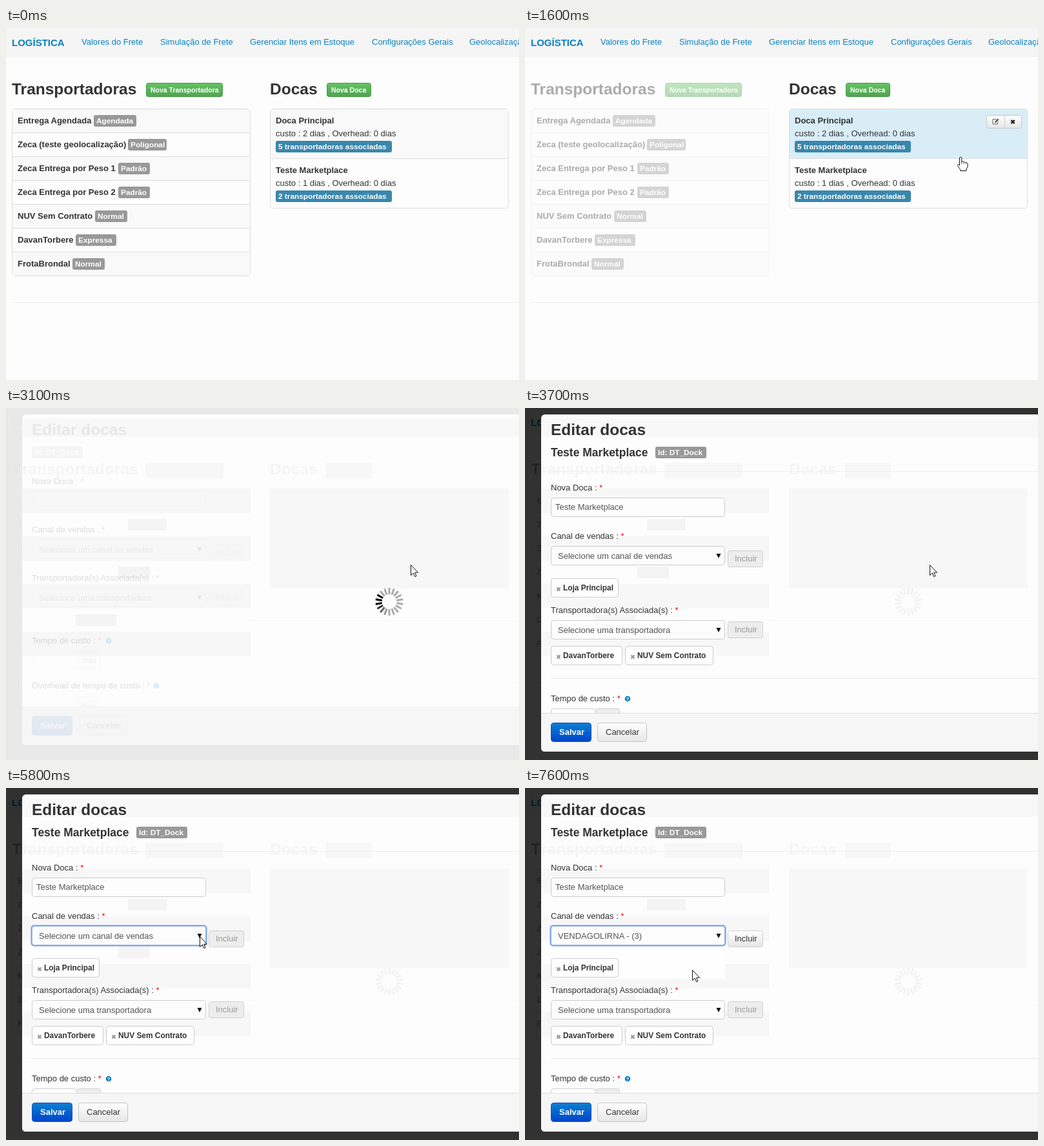
These frames come from a looping animation (795x546 px, 8 s). An HTML page:

```html
<!DOCTYPE html>
<html lang="pt">
<head>
<meta charset="utf-8">
<title>Editar docas</title>
<style>
html, body { margin: 0; width: 100%; height: 100%; overflow: hidden; background: #fdfdfd }
svg { display: block; width: 795px; height: 546px; font: 13px "Liberation Sans", Arial, sans-serif; fill: #333 }
.b { font-weight: bold }
.h { font-weight: bold; font-size: 24.5px }
.tag { font-weight: bold; font-size: 11.844px; fill: #fff }
.mini { font-weight: bold; font-size: 10.5px; fill: #fff }
.chip { font-weight: bold; font-size: 11.9px }
.nav { fill: #0a80c4 }
.field { fill: #555 }
.req { fill: #f00 }
</style>
</head>
<body>
<svg viewBox="0 0 795 546">
  <defs>
    <linearGradient id="green" x2="0" y2="1"><stop stop-color="#62c462"/><stop offset="1" stop-color="#51a351"/></linearGradient>
    <linearGradient id="blue" x2="0" y2="1"><stop stop-color="#0a80d0"/><stop offset="1" stop-color="#0044cc"/></linearGradient>
    <linearGradient id="grey" x2="0" y2="1"><stop stop-color="#fff"/><stop offset="1" stop-color="#e6e6e6"/></linearGradient>
  </defs>
  <g id="stage"></g>
</svg>
<script>
const $ = id => document.getElementById(id);
const text = (x, y, s, cls = '') => `<text x="${x}" y="${y}" class="${cls}">${s}</text>`;
const rect = (x, y, w, h, fill, more = '') => `<rect x="${x}" y="${y}" width="${w}" height="${h}" fill="${fill}" ${more}/>`;
const box = (x, y, w, h, fill, stroke = '#ccc', r = 4) =>
  rect(x + .5, y + .5, w - 1, h - 1, fill, `stroke="${stroke}" rx="${r}"`);
const group = (id, s) => `<g id="${id}">${s}</g>`;
const path = (d, more) => `<path d="${d}" ${more}/>`;
const cross = (x, y, r, color) =>
  path(`M${x - r} ${y - r}l${2 * r} ${2 * r}m0 ${-2 * r}l${-2 * r} ${2 * r}`, `stroke="${color}" stroke-width="2.4"`);
const tag = (x, y, w, s, fill = '#999') => rect(x, y, w, 18, fill, 'rx="3"') + text(x + 4, y + 13, s, 'tag');
const greenButton = (x, w, s) => box(x, 85, w, 22, 'url(#green)', '#4a9a4a', 3) + text(x + 7, 100, s, 'mini');
const label = (y, s) => `<text x="40" y="${y}">${s} : <tspan class="req">*</tspan></text>`;
const help = (x, y) => `<circle cx="${x}" cy="${y}" r="4.3" fill="#0a80c4"/>` +
  `<text x="${x}" y="${y + 3}" font-size="8" font-weight="bold" fill="#fff" text-anchor="middle">?</text>`;
const chip = (x, y, w, s) => box(x, y, w, 30, '#fefefe') + cross(x + 12, y + 17, 2.5, '#999') + text(x + 19, y + 19, s, 'chip');
const select = (y, s, id) => box(40, y, 270, 30, '#fcfcfc') +
  `<text id="${id}" x="51" y="${y + 20}" class="field">${s}</text>` + path(`M296.5 ${y + 12}h7l-3.5 7z`, 'fill="#111"');
const include = (y, fill, color) => box(314, y, 55, 26, fill, '#d0d0d0', 3) +
  `<text x="325" y="${y + 17}" style="fill:${color}">Incluir</text>`;
const daysField = y => box(40, y, 70, 30, '#fff') + box(109, y, 38, 30, '#eee') + text(117, y + 20, 'dias', 'field');

const carriers = [
  ['Entrega Agendada', 'Agendada', 136, 66], ['Zeca (teste geolocalização)', 'Poligonal', 189, 60],
  ['Zeca Entrega por Peso 1', 'Padrão', 174, 49], ['Zeca Entrega por Peso 2', 'Padrão', 174, 49],
  ['NUV Sem Contrato', 'Normal', 138, 50], ['DavanTorbere', 'Expressa', 108, 63], ['FrotaBrondal', 'Normal', 103, 50]];
const nav = [['Valores do Frete', 117], ['Simulação de Frete', 239], ['Gerenciar Itens em Estoque', 378],
  ['Configurações Gerais', 567], ['Geolocalização', 718]];
const options = ['Selecione um canal de vendas', 'B2B - (2)', 'VENDAGOLIRNA - (3)'];

const left = text(9, 103, 'Transportadoras', 'h') + greenButton(217, 119, 'Nova Transportadora') +
  box(9, 125, 370, 260, '#fdfdfd', '#ddd') +
  carriers.map(([name, kind, x, w], i) => {
    const y = 125 + 37 * i;
    return (i % 2 ? '' : rect(10, y + 1, 368, 36, '#f9f9f9')) + (i ? rect(10, y, 368, 1, '#ddd') : '') +
      text(18, y + 23, name, 'b') + tag(x, y + 10, w, kind);
  }).join('');

const dock = (y, name, cost, count) => text(418, y + 23, name, 'b') +
  text(418, y + 43, `custo : ${cost} dias , Overhead: 0 dias`) +
  tag(418, y + 50, 180, count + ' transportadoras associadas', '#3a87ad');

const tools = box(715, 135, 55, 21, 'url(#grey)', '#c8c8c8', 3) + rect(743, 136, 1, 19, '#ccc') + cross(756, 145.5, 2.7, '#222') +
  path('M730.5 141.500h-5.500v7.500h7.500v-3', 'fill="none" stroke="#666"') + path('M728 147l.5-2.300 4.200-4.200 1.800 1.800-4.200 4.200z', 'fill="#555"');

const page = rect(0, 0, 795, 546, '#fdfdfd') + rect(0, 0, 795, 45, '#f5f5f5') +
  `<text x="9" y="28" class="nav b" font-size="15">LOGÍSTICA</text>` +
  nav.map(([s, x]) => text(x, 26, s, 'nav')).join('') + group('left', left) +
  text(409, 103, 'Docas', 'h') + greenButton(497, 69, 'Nova Doca') +
  box(409, 125, 370, 155, '#fdfdfd', '#ddd') + rect(410, 126, 368, 76, '#f9f9f9') +
  rect(410, 126, 368, 76, '#d9edf7', 'id="hover"') + rect(410, 202, 368, 1, '#ddd') +
  dock(125, 'Doca Principal', 2, 5) + dock(202, 'Teste Marketplace', 1, 2) + group('tools', tools) +
  rect(9, 425, 786, 1, '#eee');

// faint traces of the page that stay visible through the dialog
const traces = rect(25, 16, 770, 29, '#f8f8f8') +
  [125, 199, 273, 347].map(y => rect(25, y, 354, 38, '#f7f7f7')).join('') +
  rect(409, 125, 370, 155, '#f7f7f7') + rect(216, 85, 121, 24, '#f7f7f7') + rect(496, 85, 71, 24, '#f7f7f7') +
  [[189, 172, 60], [174, 246, 49], [108, 320, 63]].map(([x, y, w]) => rect(x, y, w, 18, '#f4f4f4')).join('') +
  `<g opacity=".035">${text(25, 103, 'ransportadoras', 'h')}${text(409, 103, 'Docas', 'h')}</g>` +
  rect(25, 425, 770, 1, '#f8f8f8') + rect(379, 329, 416, 1, '#f6f6f6');

const fieldsA = rect(25, 98, 770, 1, '#eee') + box(40, 139, 270, 30, '#fdfdfd') +
  group('dockName', text(47, 158, 'Teste Marketplace', 'field')) + select(214, options[0], 'channel') +
  rect(39.5, 213.5, 271, 31, 'none', 'id="focus" stroke="#73a2ec" stroke-width="2" rx="4"') +
  group('includeOff', include(221, '#ededed', '#999')) + group('includeOn', include(221, 'url(#grey)', '#333'));
const fieldsB = select(329, 'Selecione uma transportadora', 'carrier') + include(331, '#ededed', '#999');
const fieldsC = rect(40, 419, 755, 1, '#e8e8e8') + daysField(466) + group('extraField', daysField(537));
const labelsA = label(128, 'Nova Doca') + label(203, 'Canal de vendas');
const labelsC = label(455, 'Tempo de custo') + help(159, 451) +
  group('extraLabel', label(525, 'Overhead de tempo de custo') + help(233, 521));
const chips = chip(40, 264, 105, 'Loja Principal') + chip(40, 369, 111, 'DavanTorbere') + chip(155, 369, 137, 'NUV Sem Contrato');
const list = box(40, 244, 270, 52, '#fff', '#5b82c4', 0) + rect(41, 245, 268, 17, '#1e90ff', 'id="mark"') +
  options.map((s, i) => `<text class="option" x="51" y="${[257, 274, 290][i]}">${s}</text>`).join('');

const modal = rect(25, 10, 790, 523, '#fdfdfd', 'id="panel" rx="6"') + traces +
  rect(41, 244, 269, 52, '#fefefe', 'id="cleared"') +
  `<g class="content">${text(40, 42, 'Editar docas', 'h')}
    ${group('dockTitle', `<text x="40" y="75" class="b" font-size="17.5">Teste Marketplace</text>`)}
    ${group('dockId', tag(202, 60, 79, 'Id: DT_Dock'))}
    <g class="a">${fieldsA}</g><g class="p">${fieldsB}</g><g class="c">${fieldsC}</g>${group('chips', chips)}</g>
  <g class="labels"><g class="a">${labelsA}</g><g class="p">${label(318, 'Transportadora(s) Associada(s)')}</g><g class="c">${labelsC}</g></g>
  ${group('list', list)}
  <g class="a">${path('M25 473H795V533H31Q25 533 25 527Z', 'fill="#f6f6f6"')}
    <g class="content">${rect(25, 473, 770, 1, '#ddd')}
    ${box(40, 488, 63, 30, 'url(#blue)', '#0a50b8')}<text x="53" y="507" class="b" style="fill:#fff">Salvar</text>
    ${box(112, 488, 77, 30, 'url(#grey)', '#c4c4c4')}${text(125, 507, 'Cancelar')}</g></g>`;

const SPOKES = 18;
const spokes = Array.from({length: SPOKES}, (_, i) =>
  `<path class="spoke" d="M11.500 0H21.500" stroke="#000" stroke-width="3" transform="translate(594 300.500) rotate(${(i + .5) * 360 / SPOKES})"/>`).join('');

$('stage').innerHTML = page + rect(0, 0, 795, 546, '#fdfdfd', 'id="wash"') + rect(0, 0, 795, 546, '#000', 'id="shade"') +
  group('modal', modal) + group('spinner', spokes) + group('cursor',
    path('M.5 .5V16.500L4.300 13L6.700 18.700L9 17.700L6.600 12.200H11.500Z', 'id="arrow" fill="#fff" stroke="#111"') +
    path('M-1.500 2Q0 -.5 1.700 2V8.500Q3.500 7 5 9Q6.800 8 8 10Q10.500 9.500 11 11.500V16L8.800 20V22.500H-.5V20.500L-4.500 14.500Q-4.500 11 -1.500 14Z',
      'id="hand" fill="#fff" stroke="#111"') + path('M1.700 9v3M5 10v2M8 11v1', 'id="knuckles" stroke="#444"'));

const cursorPath = [[800, 782, 79], [1000, 770, 108], [1200, 735, 150], [1600, 675, 199], [2100, 627, 243], [3800, 627, 243],
  [4300, 520, 268], [4700, 416, 260], [5000, 320, 231], [5200, 292, 235], [5300, 292, 235], [5400, 300, 230],
  [6000, 300, 230], [6400, 272, 264], [6800, 259, 282]];

function along(keys, t, k = 1) {
  const i = keys.findIndex(key => key[0] > t);
  if (i < 0) return keys[keys.length - 1][k];
  if (!i) return keys[0][k];
  const [a, b] = [keys[i - 1], keys[i]];
  return a[k] + (b[k] - a[k]) * (t - a[0]) / (b[0] - a[0]);
}
const show = (id, on) => $(id).style.display = on ? '' : 'none';
const fade = (id, v) => $(id).style.opacity = v;
const each = (sel, fn) => document.querySelectorAll(sel).forEach(fn);
const shift = (sel, x, y) => each(sel, e => e.setAttribute('transform', `translate(${x} ${y})`));

function draw(t) {
  const x = along(cursorPath, t), y = along(cursorPath, t, 2);
  const over = t >= 800 && y >= 126 && t < 3000;
  const row = y < 203 ? 0 : 1;
  show('cursor', t >= 800);
  shift('#cursor', Math.round(x), Math.round(y));
  show('arrow', !over);
  show('hand', over);
  show('knuckles', over);

  fade('left', along([[1000, 1], [1300, .4]], t));
  show('hover', over);
  show('tools', over);
  shift('#hover, #tools', 0, row * 77);

  fade('wash', along([[2900, 0], [3000, .6], [3100, .97], [3300, 0]], t));
  fade('shade', along([[3000, 0], [3100, .08], [3400, .8]], t));
  show('modal', t >= 3100);
  const ink = along([[3000, 0], [3100, .08], [3400, 1]], t);
  each('.content', e => e.style.opacity = ink);
  each('.labels', e => e.style.opacity = Math.min(1, ink * 2));

  const loaded = t >= 3500;
  for (const id of ['dockTitle', 'dockName', 'chips']) show(id, loaded);
  for (const id of ['extraField', 'extraLabel']) show(id, !loaded);
  shift('#dockId', loaded ? 0 : -162, 0);
  shift('.a', 0, loaded ? 0 : -10);
  shift('.p', 0, loaded ? 0 : -50);
  shift('.c', 0, loaded ? 0 : -90);
  $('panel').setAttribute('height', loaded ? 523 : 513);

  show('spinner', t >= 3000);
  fade('spinner', loaded ? .04 : 1);
  const turn = Math.round((t - 3100) / 100) * 2;
  each('.spoke', (e, i) => {
    const lag = ((10 + turn - i) % SPOKES + SPOKES) % SPOKES;
    e.style.opacity = loaded ? 1 : Math.max(.32, 1 - Math.max(0, lag - 2) * .2);
  });

  const chosen = t >= 7600, mark = t < 6500 ? 0 : t < 6700 ? 1 : 2;
  show('focus', t >= 5800);
  show('list', t >= 5900 && !chosen);
  show('cleared', chosen);
  shift('#mark', 0, mark * 16.5);
  each('.option', (e, i) => e.style.fill = i === mark ? '#fff' : '#444');
  $('channel').textContent = options[chosen ? 2 : 0];
  show('includeOff', !chosen);
  show('includeOn', chosen);
}

function tick() {
  draw(Math.floor(performance.now() % 8000 / 100) * 100);
  requestAnimationFrame(tick);
}
tick();
</script>
</body>
</html>
```
